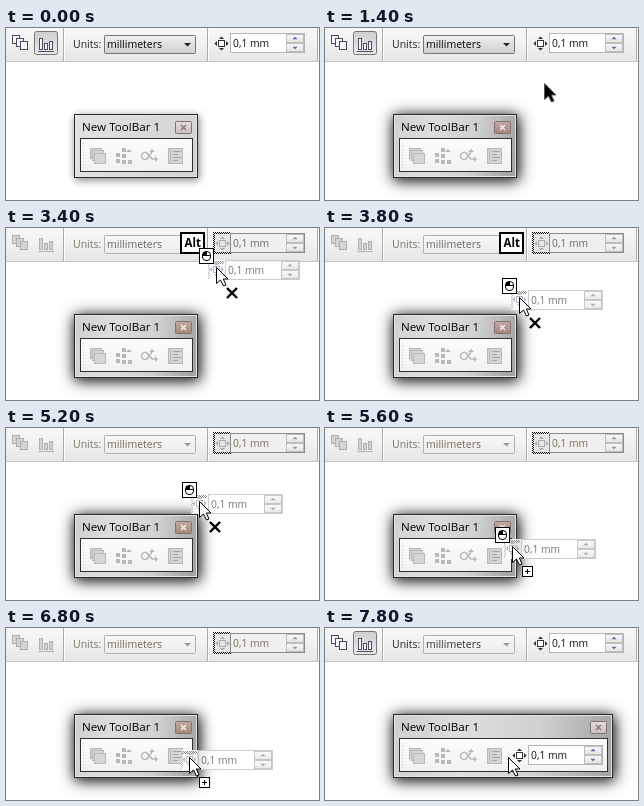
Recreate the animation shown at these times as an HTML page with a canvas. Size 313 px wide and 172 px high, loop 8000 ms.

```html
<!DOCTYPE html>
<html lang="en">
<head>
<meta charset="utf-8">
<title>Moving a control to a new toolbar</title>
<style>
html, body { margin: 0; width: 100%; height: 100%; overflow: hidden; background: #fff; }
canvas { display: block; }
</style>
</head>
<body>
<canvas id="stage" width="313" height="172"></canvas>
<script>
const ctx = document.getElementById('stage').getContext('2d');
const LOOP = 8000;
const FACE = '"Open Sans", "Noto Sans", sans-serif';

// Pointer positions: [start ms, x, y]
const PATH = [
  [1400, 219, 55], [1600, 220, 22], [1800, 216, 12], [2000, 215, 12],
  [3000, 215, 14], [3200, 214, 22], [3400, 210, 39], [3600, 205, 51],
  [3800, 194, 69], [5200, 193, 73], [5400, 188, 96], [5600, 187, 118],
  [5800, 187, 127], [6000, 186, 122], [6200, 185, 124], [6400, 184, 126],
  [6600, 183, 129]
];

function fill(x, y, w, h, color) {
  ctx.fillStyle = color;
  ctx.fillRect(x, y, w, h);
}

function box(x, y, w, h, face, edge) {
  if (face) fill(x, y, w, h, face);
  ctx.strokeStyle = edge;
  ctx.lineWidth = 1;
  ctx.strokeRect(x + 0.5, y + 0.5, w - 1, h - 1);
}

function roundBox(x, y, w, h, r, face, edge) {
  ctx.beginPath();
  ctx.roundRect(x + 0.5, y + 0.5, w - 1, h - 1, r);
  if (face) { ctx.fillStyle = face; ctx.fill(); }
  ctx.strokeStyle = edge;
  ctx.lineWidth = 1;
  ctx.stroke();
}

function shade(x0, y0, x1, y1, ...colors) {
  const g = ctx.createLinearGradient(x0, y0, x1, y1);
  colors.forEach((c, i) => g.addColorStop(i / (colors.length - 1), c));
  return g;
}

function trace(points) {
  ctx.beginPath();
  points.forEach(([x, y], i) => i ? ctx.lineTo(x, y) : ctx.moveTo(x, y));
}

function poly(points, face, edge) {
  trace(points);
  ctx.closePath();
  ctx.fillStyle = face;
  ctx.fill();
  if (edge) { ctx.strokeStyle = edge; ctx.lineWidth = 1; ctx.stroke(); }
}

function line(color, width, ...points) {
  trace(points);
  ctx.strokeStyle = color;
  ctx.lineWidth = width;
  ctx.stroke();
}

function cross(x, y, size, width, color) {
  line(color, width, [x, y], [x + size, y + size]);
  line(color, width, [x + size, y], [x, y + size]);
}

function text(label, x, y, color, size = 10.5, weight = 400) {
  ctx.font = `${weight} ${size}px ${FACE}`;
  ctx.fillStyle = color;
  ctx.fillText(label, x, y);
}

function triangle(x, y, r, dx, dy, color) {
  poly([[x + dx * r, y + dy * r], [x - dy * r, y + dx * r], [x + dy * r, y - dx * r]], color);
}

function hatch(x, y, w, h, color) {
  for (let j = 0; j < h; j++)
    for (let i = 0; i < w; i++)
      if ((i + j) % 2 === 0) fill(x + i, y + j, 1, 1, color);
}

function nudgeIcon(x, y, color, face = '#fff') {
  box(x - 3, y - 3, 7, 7, face, color);
  for (const [dx, dy] of [[1, 0], [-1, 0], [0, 1], [0, -1]])
    triangle(x + 0.5 + dx * 4.5, y + 0.5 + dy * 4.5, 2.6, dx, dy, color);
}

function spinner(x, y, ink, arrow, edge, face = '#fff') {
  box(x, y, 75, 20, face, edge);
  text('0,1 mm', x + 3, y + 14, ink, 10.3);
  for (const [top, dir] of [[y + 1, -1], [y + 10, 1]]) {
    box(x + 56, top, 18, 9, shade(0, top, 0, top + 9, '#fafafa', '#e2e2e2'), '#bdbdbd');
    triangle(x + 65, top + 4.5 - dir * 0.8, 2.6, 0, dir, arrow);
  }
}

function drawToolbar(t, dim) {
  const warm = t >= 2800 && t < 3000;
  const brown = t >= 5200 && dim;
  const faded = t >= 2800;
  const icon = dim ? '#b0b0b0' : '#4b4b62';
  const iconFace = dim ? '#d4d4d4' : '#f7f7f9';

  fill(0, 0, 313, 34, shade(0, 0, 0, 34, '#f8f8f8', '#f0f0f0', '#e6e6e6'));
  fill(0, 33, 313, 1, '#c6c6c6');
  for (const x of [57, 201, 311]) {
    fill(x, 0, 1, 33, '#aaa');
    fill(x + 1, 0, 1, 33, '#fff');
  }

  for (let i = 0; i < 3; i++) box(6 + i * 4, 7 + i * 3, 8, 9, iconFace, icon);
  if (!dim) roundBox(28, 3, 24, 24, 2, shade(0, 3, 0, 27, '#cfcfcf', '#e9e9e9'), '#777');
  for (const [x, y] of [[33, 10], [38, 15], [43, 13]]) box(x, y, 4, 22 - y, iconFace, icon);
  fill(32, 23, 16, 1, icon);

  text('Units:', 67, 20, dim ? '#7a755f' : '#222');
  roundBox(98, 7, 92, 19, 1, faded ? shade(0, 7, 0, 26, '#f7f7f7', '#ececec')
    : shade(0, 7, 0, 26, '#f1f1f1', '#e0e0e0', '#cfcfcf'), faded ? '#b0b0b0' : '#737373');
  text('millimeters', 101, 20, warm ? '#94584c' : brown ? '#736c50' : dim ? '#666' : faded ? '#333' : '#000');
  triangle(181.5, 15, 3.5, 0, 1, faded ? '#999' : '#222');

  if (dim) {
    fill(208, 5, 17, 20, '#e6e6e6');
    hatch(207, 4, 18, 2, '#000');
    hatch(207, 24, 18, 2, '#000');
    hatch(207, 6, 2, 18, '#000');
    nudgeIcon(216, 15, '#aaa', '#e6e6e6');
    spinner(224, 5, warm ? '#8d7068' : brown ? '#7d7055' : '#6b6b6b',
      warm || brown ? '#b08a83' : '#999', '#8a8a8a', '#efefef');
  } else {
    nudgeIcon(215, 15, '#333');
    spinner(224, 5, '#111', '#4d6fa5', '#b5b5b5');
  }
}

function toolIcons(x, y) {
  const ink = '#b8b8b8', pale = '#d6d6d6';
  for (let i = 2; i >= 0; i--) box(x + 4 - i * 2, y + 5 - i * 2.5 | 0, 12, 11, pale, ink);

  const b = x + 26;
  for (const [i, j] of [[6, 0], [0, 5], [6, 6], [0, 11], [6, 12], [12, 12]])
    fill(b + i, y + j, 4, 4, ink);
  triangle(b + 13, y + 4, 3, 0, -1, ink);

  const c = x + 51;
  ctx.beginPath();
  ctx.arc(c + 4, y + 8, 3.5, 0.7, 5.4);
  ctx.strokeStyle = ink;
  ctx.lineWidth = 1.5;
  ctx.stroke();
  line(ink, 1.5, [c + 6, y + 5], [c + 11, y + 11], [c + 14, y + 11]);
  line(ink, 1.5, [c + 6, y + 11], [c + 11, y + 4]);
  triangle(c + 14, y + 11, 3, 1, 0, ink);
  triangle(c + 11, y + 4, 3, 0, -1, ink);

  box(x + 78, y, 15, 16, pale, ink);
  fill(x + 80, y, 1, 16, ink);
  for (let j = 3; j < 14; j += 3) fill(x + 83, y + j, j % 2 ? 8 : 5, 1, '#a5a5a5');
}

function drawShadow(width, blur, alpha) {
  ctx.save();
  ctx.shadowColor = `rgba(0,0,0,${alpha})`;
  ctx.shadowBlur = blur;
  ctx.shadowOffsetX = 1;
  ctx.shadowOffsetY = 2;
  fill(68, 86, width, 64, '#bbb');
  ctx.restore();
}

function drawWindow(t) {
  const active = t >= 200;
  const dropped = t >= 7800;
  const w = dropped ? 220 : 124;
  const right = 68 + w;

  if (active) {
    drawShadow(w, 15, 0.7);
    drawShadow(w, 12, 0.6);
  } else {
    drawShadow(w, 8, 0.5);
  }

  const face = active ? shade(68, 86, right, 112, '#cfcfcf', '#dedede', '#d0d0d0', '#a4a4a4')
    : shade(68, 86, right, 112, '#e2e2e2', '#d4d4d4');
  box(68, 86, w, 64, face, '#2a2a2a');
  box(69, 87, w - 2, 62, null, '#e4e4e4');

  text('New ToolBar 1', 76, 103, '#000', 11.65);
  const muted = !active || dropped;
  const close = right - 23;
  roundBox(close, 93, 17, 13, 1, muted ? shade(0, 93, 0, 106, '#e2dcda', '#cbc2c0')
    : shade(0, 93, 0, 106, '#c3aaa3', '#a58479'), '#85706a');
  cross(close + 6, 97, 5, 1.6, muted ? '#9b7772' : '#f0e8e5');

  box(74, 110, w - 11, 34, shade(0, 111, 0, 144, '#fcfcfc', '#f1f1f1'), '#303030');
  for (let y = 115; y < 140; y += 3) fill(77, y, 1, 1, '#ccc');
  toolIcons(84, 120);
  if (dropped) {
    nudgeIcon(194, 127, '#333');
    spinner(203, 117, '#111', '#4d6fa5', '#b5b5b5');
  }
}

function drawGhost(x, y) {
  ctx.save();
  ctx.globalAlpha = 0.8;
  fill(x - 8, y - 7, 17, 20, '#fff');
  hatch(x - 8, y - 6, 16, 3, '#777');
  hatch(x - 8, y - 3, 2, 15, '#aaa');
  nudgeIcon(x, y + 2, '#a6a6b4');
  spinner(x + 9, y - 7, '#555', '#999', '#c0c0c0');
  ctx.restore();
}

function drawPointer(x, y, dark) {
  const shape = [[0, 0], [0, 16], [4, 12.5], [7, 18.5], [9.5, 17.5], [6.8, 11.5], [11.5, 11.5]];
  poly(shape.map(([i, j]) => [x + i + 0.5, y + j + 0.5]), dark ? '#000' : '#fff', dark ? '#555' : '#000');
}

function drawMouse(x, y) {
  box(x, y, 15, 16, '#fff', '#000');
  roundBox(x + 3, y + 3, 9, 10, 3.5, null, '#000');
  fill(x + 4, y + 4, 4, 4, '#000');
  fill(x + 4, y + 7, 7, 1, '#000');
}

function drawBadge(x, y, canDrop) {
  if (canDrop) {
    box(x + 10, y + 20, 11, 11, '#fff', '#000');
    fill(x + 13, y + 25, 5, 1, '#000');
    fill(x + 15, y + 23, 1, 5, '#000');
  } else {
    cross(x + 11, y + 21, 10, 2.4, '#000');
  }
}

function drawAlt() {
  fill(174, 4, 25, 22, '#000');
  fill(176, 6, 21, 18, '#fff');
  text('Alt', 178.5, 19, '#000', 11.5, 700);
}

function render(t) {
  const dim = t >= 2800 && t < 7800;
  fill(0, 0, 313, 172, '#fff');
  drawToolbar(t, dim);
  drawWindow(t);
  if (t >= 2800 && t < 4800) drawAlt();

  const spot = PATH.filter(([start]) => start <= t).pop();
  if (!spot) return;
  const [, x, y] = spot;
  const carrying = t >= 3200 && dim;
  if (carrying) drawGhost(x, y);
  if (t >= 2800 && t < 6800) drawMouse(x - 17, y - 19);
  drawPointer(x, y, t < 2000);
  if (carrying) drawBadge(x, y, t >= 5600);
}

const origin = performance.now();
function tick() {
  render((performance.now() - origin) % LOOP);
  requestAnimationFrame(tick);
}
tick();
</script>
</body>
</html>
```
